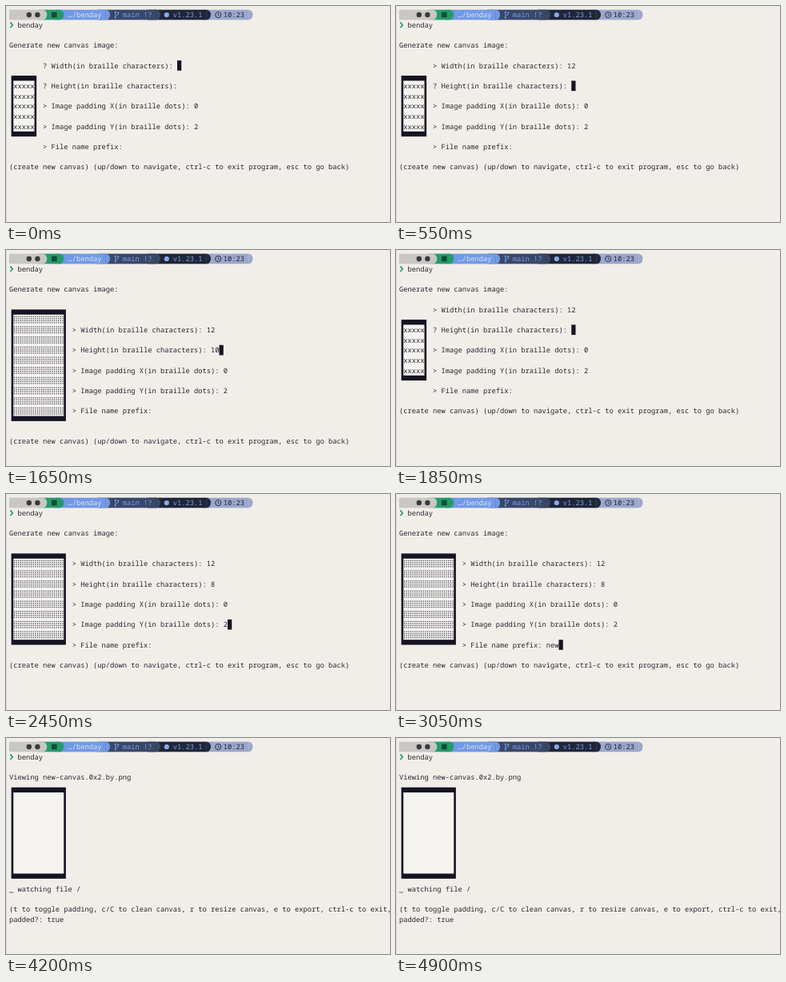
Animation of 480x270 px, one loop 5 s. Source, as an HTML page with a canvas:

```html
<!DOCTYPE html>
<html lang="en">
<head>
<meta charset="utf-8">
<title>Canvas generator</title>
<style>
html, body { margin: 0; width: 100%; height: 100%; overflow: hidden; background: #f1eeea; }
canvas { display: block; width: 480px; height: 270px; }
</style>
</head>
<body>
<canvas id="stage"></canvas>
<script>
const canvas = document.getElementById('stage');
const ctx = canvas.getContext('2d');
const ratio = window.devicePixelRatio || 1;
canvas.width = 480 * ratio;
canvas.height = 270 * ratio;

const LOOP = 5000;
const CW = 5.25, RH = 12.68;
const INK = '#25242b', DARK = '#161322', PAPER = '#f1eeea', LIGHT = '#f5f3f0';
const FORM_ROW = 5, FORM_ROWS = 9;

const colX = c => 4 + c * CW;
const rowY = r => 11 + r * RH;

function rect(x, y, w, h, color) {
  ctx.fillStyle = color;
  ctx.fillRect(x, y, w, h);
}

function disc(x, y, r, color) {
  ctx.fillStyle = color;
  ctx.beginPath();
  ctx.arc(x, y, r, 0, Math.PI * 2);
  ctx.fill();
}

function line(points, color, width) {
  ctx.strokeStyle = color;
  ctx.lineWidth = width;
  ctx.beginPath();
  points.forEach(([x, y], i) => i ? ctx.lineTo(x, y) : ctx.moveTo(x, y));
  ctx.stroke();
}

function text(str, col, row, color = INK) {
  ctx.fillStyle = color;
  ctx.fillText(str, colX(col), rowY(row) + 3.1);
}

// Header segment with a rounded right end
function segment(from, to, color) {
  const x = colX(from), end = colX(to) - CW, y = rowY(0);
  rect(x, y - RH / 2, end - x, RH, color);
  ctx.beginPath();
  ctx.ellipse(end, y, CW, RH / 2, 0, -Math.PI / 2, Math.PI / 2);
  ctx.fill();
}

function header() {
  const y = rowY(0);
  // Right to left, so each end overlaps the next segment
  segment(46, 58, '#9ca7cb');
  segment(33, 48, '#1f2638');
  segment(21, 36, '#394768');
  segment(11, 24, '#7099e8');
  segment(7, 13, '#239c6a');
  segment(0, 9, '#c9c7c4');

  disc(28.8, y, 3.2, '#3a393c');
  disc(39.4, y, 3.2, '#3a393c');
  rect(57, y - 3.3, 6.6, 6.6, '#154b3b');
  text('…/benday', 14, 0, '#e1e6ee');

  const blue = '#7b9fe9';
  line([[136.8, y - 3], [136.8, y + 3]], blue, 0.8);
  line([[136.8, y + 1.3], [140.2, y - 0.2], [140.2, y - 2]], blue, 0.8);
  disc(136.8, y - 3.2, 1.1, blue);
  disc(136.8, y + 3.4, 1.1, blue);
  disc(140.2, y - 2.4, 1.1, blue);
  text('main !?', 27, 0, blue);

  disc(200.8, y, 3.1, '#86a9ee');
  text('v1.23.1', 39, 0, blue);

  ctx.strokeStyle = '#20263a';
  ctx.lineWidth = 0.9;
  ctx.beginPath();
  ctx.arc(265.2, y, 3.6, 0, Math.PI * 2);
  ctx.stroke();
  line([[265.2, y - 2.2], [265.2, y + 0.2], [267, y + 1]], '#20263a', 0.8);
  text('10:23', 51, 0, '#20263a');

  const p = rowY(1);
  line([[5.4, p - 3.3], [8.2, p], [5.4, p + 3.3]], '#259a6c', 1.7);
  text('benday', 2, 1);
}

// Half-cell border around cols x rows cells; row is the top border's row
function frame(row, cols, rows) {
  const x = colX(1), y = rowY(row) + RH / 2;
  const w = cols * CW, h = rows * RH;
  rect(x - CW / 2, y - RH / 2, w + CW, h + RH, DARK);
  rect(x, y, w, h, LIGHT);
}

function dots(row, cols, rows) {
  ctx.fillStyle = '#4a4950';
  for (let r = 0; r < rows; r++)
    for (let j = 0; j < 4; j++)
      for (let i = 0; i < cols * 2; i++) {
        const x = colX(1) + (i + 0.5) * CW / 2;
        const y = rowY(row + 1 + r) + (j - 1.5) * 2.5;
        ctx.fillRect(x - 0.65, y - 0.65, 1.3, 1.3);
      }
}

function form(width, height, name, focus, confirm) {
  const valid = width && height;
  const cols = valid ? +width : 5, rows = valid ? +height : 5;
  const total = Math.max(FORM_ROWS, rows + 2);
  const top = FORM_ROW + Math.floor((total - rows - 2) / 2);
  const first = FORM_ROW + Math.ceil((total - FORM_ROWS) / 2);
  const end = FORM_ROW + total;

  text('Generate new canvas image:', 0, 3);
  frame(top, cols, rows);
  if (valid) dots(top, cols, rows);
  else for (let r = 1; r <= rows; r++) text('xxxxx', 1, top + r);

  const fields = [
    ['Width(in braille characters): ', width],
    ['Height(in braille characters): ', height],
    ['Image padding X(in braille dots): ', '0'],
    ['Image padding Y(in braille dots): ', '2'],
    ['File name prefix: ', name]
  ];
  fields.forEach(([label, value], i) => {
    const row = first + i * 2;
    const mark = i < 2 && !value ? '? ' : '> ';
    const str = mark + label + value;
    text(str, cols + 3, row);
    if (i === focus) rect(colX(cols + 3 + str.length), rowY(row) - RH / 2, CW, RH, DARK);
  });

  if (confirm) {
    text('Are you sure you want to create this file?', 2, end + 1);
    text('"new-canvas.0x2.by.png"', 2, end + 2);
    text('(create new canvas) (y/enter to confirm, b/esc to go back)', 0, end + 4);
  } else {
    text('(create new canvas) (up/down to navigate, ctrl-c to exit program, esc to go back)', 0, end + 1);
  }
}

function viewer(t) {
  text('Viewing new-canvas.0x2.by.png', 0, 3);
  frame(4, 12, 8);
  const turned = t >= 4600 && t < 4900;
  text(turned ? '/ watching file _' : '_ watching file /', 0, 14);
  text('(t to toggle padding, c/C to clean canvas, r to resize canvas, e to export, ctrl-c to exit,', 0, 16);
  text('padded?: true', 0, 17);
}

// Last value whose start time has passed
function at(t, keys) {
  let value;
  for (const [start, v] of keys) if (t >= start) value = v;
  return value;
}

const WIDTH = [[0, ''], [50, '1'], [200, '12']];
const HEIGHT = [[0, ''], [1100, '1'], [1200, '10'], [1750, '1'], [1850, ''], [1950, '8']];
const FOCUS = [[0, 0], [450, 1], [2150, 2], [2400, 3], [2650, 4], [3500, -1]];

function typedName(t) {
  if (t < 2950) return '';
  const step = Math.floor((t - 2950) / 50);
  return 'new-canvas'.slice(0, 1 + Math.floor(step * 1.3));
}

function draw(t) {
  ctx.setTransform(ratio, 0, 0, ratio, 0, 0);
  ctx.font = '8.75px "Noto Sans Mono", "DejaVu Sans Mono", monospace';
  ctx.textRendering = 'geometricPrecision';
  ctx.textBaseline = 'alphabetic';
  rect(0, 0, 480, 270, PAPER);
  rect(0, 0, 1, 270, '#dfdcda');
  header();
  if (t >= 4050) viewer(t);
  else form(at(t, WIDTH), at(t, HEIGHT), typedName(t), at(t, FOCUS), t >= 3500);
}

const begin = performance.now();
function tick() {
  draw((performance.now() - begin) % LOOP);
  requestAnimationFrame(tick);
}
tick();
</script>
</body>
</html>
```
